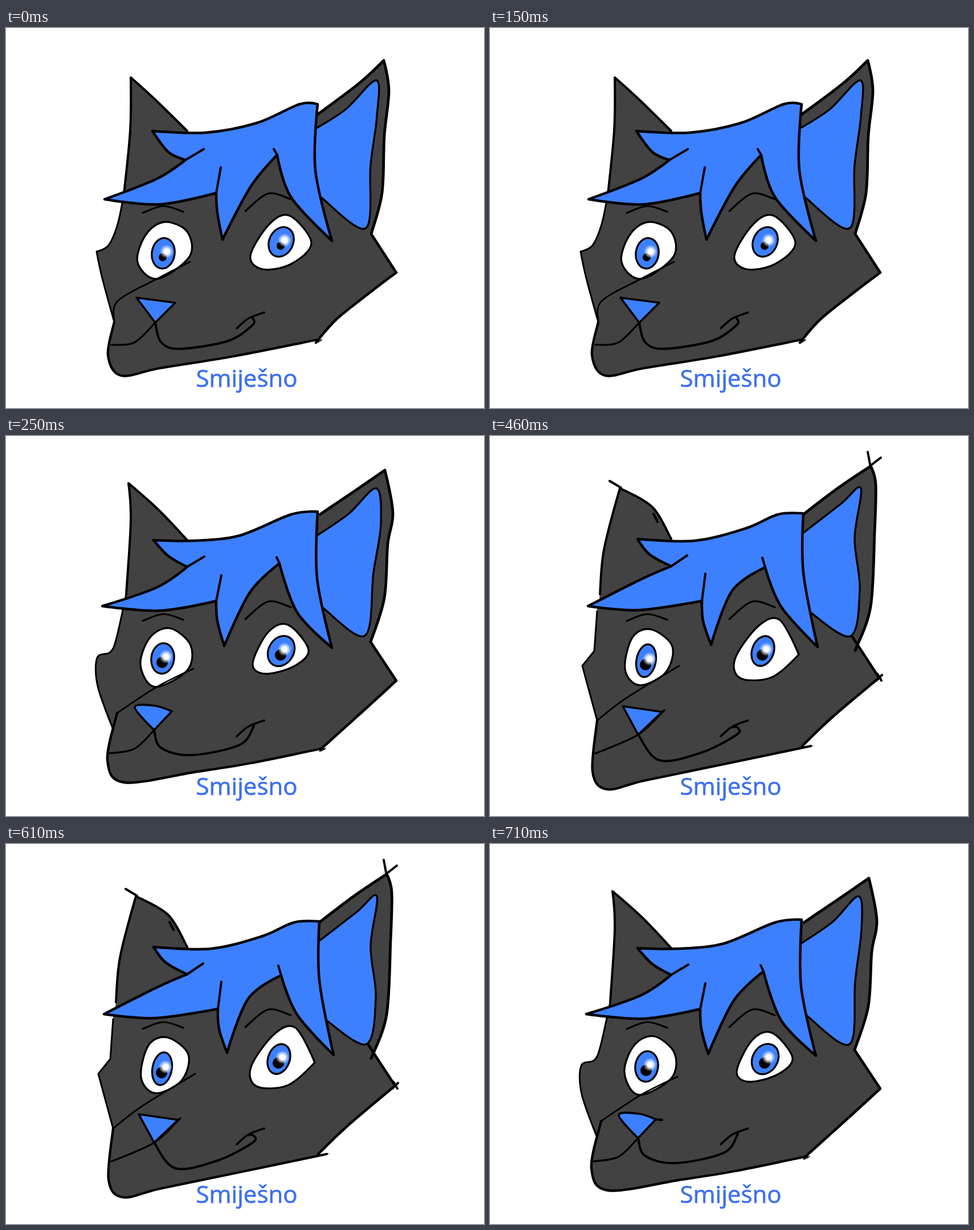
Animation, 839 px wide and 668 px high, one loop 0.87 s. Source, as an HTML page:

```html
<!DOCTYPE html>
<html lang="hr">
<head>
<meta charset="utf-8">
<style>
html, body { margin: 0; width: 100%; height: 100%; overflow: hidden; background: #fff; }
svg { display: block; width: 839px; height: 668px; }
path, ellipse { stroke: #000; stroke-linecap: round; stroke-linejoin: round; }
text { font: 42px "Open Sans", "Noto Sans", sans-serif; fill: #3c6ff2; stroke: #3c6ff2; stroke-width: .7px; }
</style>
</head>
<body>
<svg viewBox="0 0 839 668">
  <defs>
    <radialGradient id="glint">
      <stop offset=".35" stop-color="#fff"/>
      <stop offset="1" stop-color="#fff" stop-opacity="0"/>
    </radialGradient>
  </defs>
  <g id="stage"></g>
  <text x="333.5" y="631">Smiješno</text>
</svg>
<script>
const GREY = '#424242', BLUE = '#3d80ff';
const OUTLINE = { earL: 4, cheek: 3, muzzle: 4.3, jaw: 4.5, earR: 4.8 };
const LINES = { brows: 3.2, snout: 2.8, lip: 3.2, mouth: 4, smile: 3.5, marks: 4 };

// Smooth curve through "x,y" key points; a trailing "!" marks a sharp corner.
function curve(s, closed) {
  const p = s.trim().split(/\s+/).map(k => ({
    xy: k.replace('!', '').split(',').map(Number), sharp: k.endsWith('!')
  }));
  const n = p.length;
  const at = i => closed ? p[(i + n) % n] : p[Math.max(0, Math.min(n - 1, i))];
  const handle = (i, k) => at(i).xy.map((v, j) =>
    v + (at(i).sharp ? 0 : (at(i + 1).xy[j] - at(i - 1).xy[j]) * k / 6));
  let d = `M${p[0].xy}`;
  for (let i = 0; i < n - !closed; i++) d += `C${handle(i, 1)} ${handle(i + 1, -1)} ${at(i + 1).xy}`;
  return d;
}

const path = (d, fill, w) => `<path d="${d}" fill="${fill}" stroke-width="${w}"/>`;
const shape = (s, fill, w) => path(curve(s, true), fill, w);
const lines = (pose, widths) => Object.keys(widths).filter(k => pose[k])
  .map(k => path(pose[k].split('|').map(s => curve(s)).join(''), 'none', widths[k])).join('');

// Pupil and glint sit at fixed offsets from the iris centre.
function eye({ white, iris: [x, y, rx, ry, tilt] }, pupil) {
  return shape(white, '#fff', 3.3) +
    `<ellipse cx="${x}" cy="${y}" rx="${rx}" ry="${ry}" transform="rotate(${tilt} ${x} ${y})" fill="${BLUE}" stroke-width="3.3"/>` +
    `<circle cx="${x - 1}" cy="${y + 7}" r="${pupil}"/>` +
    `<circle cx="${x + 6}" cy="${y - 3}" r="12" fill="url(#glint)"/>`;
}

function draw(pose) {
  const underHair = ' 520,200! 400,230! 320,210!';
  const head = Object.keys(OUTLINE).map(k => pose[k]).join(' ') + underHair;
  return shape(head, GREY, 0) + lines(pose, OUTLINE) +
    path(curve(pose.ear), BLUE, 3.4) +
    pose.eyes.map(e => eye(e, pose.pupil)).join('') +
    lines(pose, LINES) +
    shape(pose.nose, BLUE, 3.6) + shape(pose.hair, BLUE, 4.5) +
    lines(pose, { strands: 4 });
}

const shared = {
  brows: '240,325 276,313 311,323 | 420,322 460,291 500,301',
  smile: '405,528 425,511 453,500',
  pupil: 10
};

const calm = {
  ...shared,
  earL: '318,181 262,126 219,87! 218,180 207,292',
  cheek: '207,292 196,345 180,382 159,393! 169,440 190,517',
  muzzle: '190,517 179,575 202,611 270,598 400,577 546,548',
  jaw: '544,553 580,512 640,464 685,430! 641,362',
  earR: '641,362 660,290 664,190 672,110 663,57! 620,97 547,152',
  ear: '535,182 595,144 650,92 651,155 640,240 631,352 551,296',
  hair: `257,181! 350,184 440,167 515,134 547,134! 543,250 572,374! 500,297 476,223!
    430,278 380,372! 371,325 369,290! 270,310 173,301! 265,265 315,232! 285,218`,
  strands: '315,232 347,213 | 476,223 470,213 | 369,290 377,245',
  eyes: [
    { white: '278,341 318,358 322,402 265,441 231,412 245,364', iris: [276, 396, 20, 27, 8] },
    { white: '498,330 536,378 500,415 450,424 429,400 462,345', iris: [483, 376, 21, 27, 25] }
  ],
  pupil: 7,
  snout: '323,411 265,441 196,480 190,517',
  lip: '262,518 225,553 185,557',
  mouth: '262,518 272,552 305,564 390,550 433,522 433,510',
  nose: '229,474! 297,483! 262,518!'
};

const bright = {
  ...shared,
  earL: '318,183 268,130 215,83! 219,150 211,278',
  cheek: '211,278 194,355 183,380 160,390 161,440 188,516',
  muzzle: '195,487 178,570 208,609 330,591 430,575 556,549',
  jaw: '552,551 635,476 685,430! 640,362',
  earR: '640,362 664,285 670,190 679,135 665,60! 610,98 551,138',
  ear: '535,182 600,138 650,92 658,155 645,240 630,351 555,301',
  hair: `259,183! 330,184 410,175 500,138 547,133! 546,250 572,372! 511,310 480,224!
    428,275 383,369! 371,325 369,290! 270,307 169,299! 265,266 318,230! 285,211`,
  strands: '318,230 348,212 | 480,224 475,213 | 369,290 378,245',
  eyes: [
    { white: '288,338 324,368 318,412 261,441 236,402 253,354', iris: [275, 391, 20, 27, 8] },
    { white: '495,332 531,376 505,405 455,418 433,400 460,345', iris: [483, 378, 22, 28, 30] }
  ],
  snout: '329,409 265,441 195,487',
  lip: '260,517 225,550 180,558',
  mouth: '260,517 272,548 325,561 410,543 435,510',
  nose: '226,477 260,474 291,484! 260,517!'
};

const rough = {
  ...shared,
  earL: '318,181 285,125 228,92! 200,200 193,278',
  cheek: '188,308 183,378! 162,404! 188,500',
  muzzle: '188,500 180,590 205,621 270,606 410,577 563,545',
  jaw: '548,545 600,495 683,425! 636,353',
  earR: '641,377 668,300 675,170 677,85 668,53! 610,92 551,137',
  ear: '540,178 615,120 651,92 640,180 649,270 632,352 557,306',
  hair: `259,181! 360,184 450,162 505,138 550,136! 550,240 575,371! 511,300 483,231!
    425,272 388,367! 374,325 372,290! 260,306 172,299! 265,252 318,229! 280,208`,
  strands: '318,229 346,210 | 483,231 478,214 | 372,290 378,242',
  eyes: [
    { white: '283,340 320,370 308,416 262,438 237,410 250,354', iris: [274, 395, 17, 29, 10] },
    { white: '508,323 542,384! 495,424 440,426 430,392 470,335', iris: [479, 378, 19, 27, 20] }
  ],
  snout: '332,404 240,460 188,500',
  lip: '306,482 260,525 185,558',
  mouth: '260,525 297,570 370,557 433,525 434,512 425,512',
  nose: '233,475! 302,485! 260,525!',
  marks: '210,79 230,91 | 287,137 294,151 | 663,28 668,55 | 668,52 686,38 | 680,418 687,430 | 688,420 678,430'
};

const settled = {
  ...bright,
  ear: '535,182 600,138 647,92 652,150 641,240 631,352 555,301',
  marks: '291,484 302,485'
};

const LOOP = 870, ends = [250, 460, 710, LOOP];
const scenes = [calm, bright, rough, settled].map(draw);
const stage = document.getElementById('stage');
let shown = -1;

function tick() {
  const t = performance.now() % LOOP;
  const i = ends.findIndex(end => t < end);
  if (i !== shown) stage.innerHTML = scenes[shown = i];
  requestAnimationFrame(tick);
}
tick();
</script>
</body>
</html>
```
